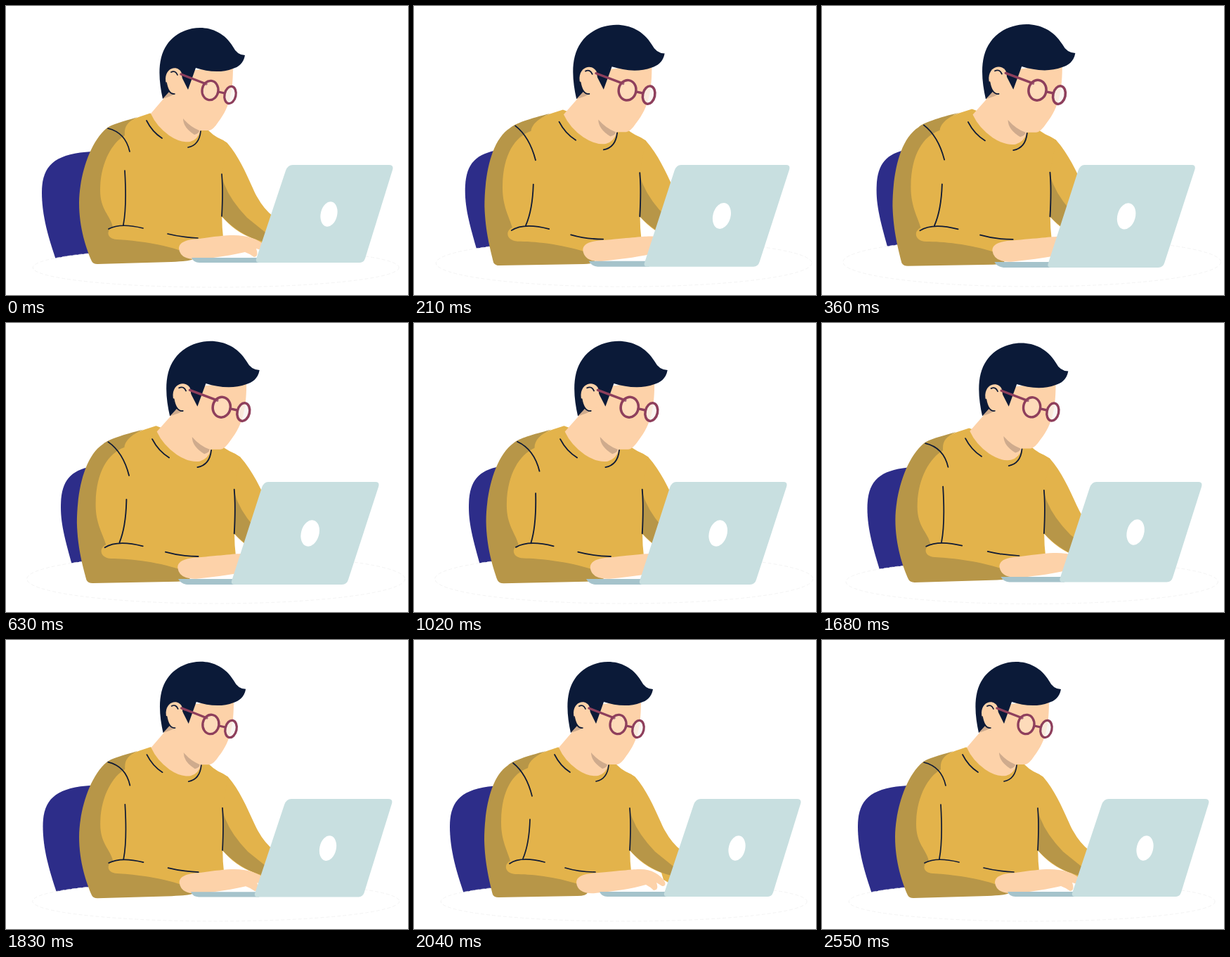
These frames come from a looping animation (572x411 px, 2.7 s). An HTML page:

```html
<!DOCTYPE html>
<html lang="en">
<head>
<meta charset="utf-8">
<title>Typing at a laptop</title>
<style>
  html, body { margin: 0; width: 100%; height: 100%; overflow: hidden; background: #fff; }
  svg { display: block; width: 572px; height: 411px; }
  .sweater { fill: #e3b34b; }
  .shade { fill: #b79648; }
  .skin { fill: #fdd2a9; }
  .skin-shade { fill: #cfab8d; }
  .hair { fill: #0b1a38; }
  .line { fill: none; stroke: #0f1a35; stroke-width: 1.7; stroke-linecap: round; }
  .glasses { fill: none; stroke: #8e3f5c; stroke-width: 3.3; stroke-linecap: round; }
</style>
</head>
<body>
<svg viewBox="0 0 572 411">
  <path id="chair" fill="#2d2d89"/>
  <ellipse id="floor" fill="#fff" stroke="#eee" stroke-width=".7" stroke-dasharray="5 3"/>

  <g id="torso">
    <path class="sweater" d="M300,187 Q308,190 315,195 C336,219 349,257 357,271 Q367,289 380,299 L362,345 L355,341 L352,331 Q325,321 307,299Z"/>
    <path class="shade" d="M308,246 Q316,273 343,301 L374,326 L366,335 Q333,327 307,299Z"/>
    <path class="sweater" d="M205,152.500 Q175,162 150,174 C125,190 112,240 114,270 C115,300 118,320 125,340 L250,353 L310,340 Q307,315 307,290 L307,240 L315,195 Q308,190 301,187 Q294,183 288,177 L250,170Z"/>
    <path class="line" d="M307,239 Q309,262 307,299"/>
  </g>

  <g id="head">
    <path class="skin" d="M235,95 L323,85 C323,118 320,142 302,165 Q295,176 289,177 L277,177 Q273,190 262,193 Q248,195 232,184 Q214,171 206,153 L224,132 L236,120Z"/>
    <path class="skin-shade" d="M252,160 Q252,173 268,183 Q275,181 275,177 Q262,172 252,160Z M223,132 L231,117 Q235,126 240,125 Q236,128 223,132Z"/>
    <path class="hair" d="M223,132 C217,105 215,75 229,55 C248,26 300,19 323,58 Q329,70 340,70 C338,82 330,87 323,89 C305,96 286,93 270,88 L259,119 L248,97 L233,121Z"/>
    <path class="skin" d="M240,125 C231,124 227,113 227,103 C228,86 246,84 250,96 L252,118Z"/>
    <path class="line" d="M235,94 Q241,91 244,98 M228,109 Q231,126 240,125 M200,163 Q208,179 222,188 M277,178 Q275,198 259,201"/>
    <g class="glasses">
      <path d="M249,97 L285,111 M302,122 L311,124"/>
      <ellipse cx="290.5" cy="120" rx="11.5" ry="13.7" transform="rotate(8 290.5 120)" fill="#fff" fill-opacity=".2"/>
      <ellipse cx="319" cy="126.500" rx="8" ry="12.300" transform="rotate(12 319 126.500)" fill="#f7f1ee" fill-opacity=".75"/>
    </g>
  </g>

  <g id="arm">
    <path id="sleeve" class="shade"/>
    <path id="hand" class="skin"/>
    <path id="creases" class="line"/>
  </g>

  <path id="base" fill="#a5c3cb"/>
  <path id="screen" fill="#c8dfe0"/>
  <ellipse id="spot" fill="#fff"/>
</svg>
<script>
const LOOP = 2700, STEP = 30;

// Each shape has two poses: upright / leaning.
const leanShapes = {
  chair: ["M75,372 C60,330 51,298 51,265 C51,226 70,210 122,207 L140,372Z",
          "M98,358 C85,312 78,288 78,262 C78,226 90,210 122,204 L140,372Z"],
  base: ["M264,358 H362 V365 H275 Q267,365 264,358Z",
         "M245,364 H328 V372 H258 Q249,371 245,364Z"],
  screen: ["M408,226 H545 Q552,226 550,233 L511,359 Q509,365 503,365 H360 Q355,365 356,360 L398,234 Q401,226 408,226Z",
           "M373,226 H526 Q532,226 530,233 L487,365 Q485,372 478,372 H325 Q320,372 321,367 L364,234 Q367,226 373,226Z"]
};

// Two poses: forearm forward / drawn back.
const armShapes = {
  sleeve: ["M187,158 C165,165 150,168 143,174 C118,195 104,245 104,280 C104,315 114,345 122,363 Q124,367 130,367 L235,364 Q262,363 266,360 L252,349 C215,336 175,333 158,332 C143,331 142,319 152,314 C148,297 134,290 134,262 C134,225 150,195 169,184 C168,172 172,165 187,158Z",
           "M188,158 C160,165 140,172 134,178 C108,195 100,245 100,285 C101,320 108,345 112,362 Q114,366 120,366 L232,364 Q246,364 247,359 L236,348 C200,336 165,333 144,333 C129,332 127,319 137,314 C133,300 124,285 124,260 C124,215 140,190 162,182 C163,172 175,163 188,158Z"],
  hand: ["M246,345 C246,336 256,332 275,331 C295,328 312,326 324,326 C342,326 358,331 368,340 Q370,347 366,348 L356,345 Q360,356 353,357 Q346,352 340,350 C322,354 300,358 275,360 Q248,362 246,345Z",
         "M231,345 C231,336 241,332 262,331 C295,328 312,326 322,326 C338,326 350,333 357,344 Q359,350 353,350 L345,345 Q349,356 341,356 Q336,351 330,348 C310,354 285,357 258,360 Q233,362 231,345Z"],
  creases: ["M145,174 Q170,180 176,207 M169,234 Q172,285 167,311 M146,317 Q163,308 195,316 M230,324 Q250,329 273,330",
            "M141,175 Q160,190 168,222 M165,255 Q164,290 155,311 M136,318 Q152,307 186,316 M215,324 Q235,330 258,330"]
};

const el = id => document.getElementById(id);
const mix = (a, b, k) => a + (b - a) * k;
const smooth = u => u * u * (3 - 2 * u);
const ramp = (t, from, to) => Math.min(1, Math.max(0, (t - from) / (to - from)));
const ease = (t, from, to) => smooth(ramp(t, from, to));

function mixPath([a, b], k) {
  const target = b.match(/[\d.]+/g);
  let i = 0;
  return a.replace(/[\d.]+/g, n => mix(+n, +target[i++], k).toFixed(2));
}

function setShapes(shapes, k) {
  for (const id in shapes) el(id).setAttribute("d", mixPath(shapes[id], k));
}

function setEllipse(id, cx, cy, rx, ry, angle) {
  const attrs = { cx, cy, rx, ry, transform: `rotate(${angle} ${cx} ${cy})` };
  for (const name in attrs) el(id).setAttribute(name, attrs[name]);
}

// Scales a group about a fixed point.
function stretch(id, cx, cy, growX, growY) {
  el(id).setAttribute("transform",
    `matrix(${1 + growX} 0 0 ${1 + growY} ${-cx * growX} ${-cy * growY})`);
}

function draw(t) {
  const lean = 1 - (1 - ramp(t, 0, 450)) ** 2.6 - ease(t, 1470, 1890);
  const back = ease(t, 0, 210) - ease(t, 600, 750) + ease(t, 900, 1140)
    - ease(t, 1350, 1500) + ease(t, 1890, 2040) - ease(t, 2400, 2550);

  setShapes(leanShapes, lean);
  setShapes(armShapes, back);
  setEllipse("floor", 298.7, mix(372, 364, lean), mix(260.5, 269, lean), mix(28, 35, lean), 0);
  setEllipse("spot", mix(459.5, 432.7, lean), mix(296, 299, lean), mix(11.7, 12.7, lean), mix(18, 19, lean), mix(13, 16, lean));
  stretch("torso", 110, 290, 0.09 * lean, 0.045 * lean);
  stretch("arm", 95, 290, 0.085 * lean, 0.05 * lean);
  stretch("head", 110, 125, 0.09 * lean, 0.055 * lean);
}

const start = performance.now();
function tick() {
  const t = (performance.now() - start) % LOOP;
  draw(Math.floor(t / STEP) * STEP);
  requestAnimationFrame(tick);
}
tick();
</script>
</body>
</html>
```
